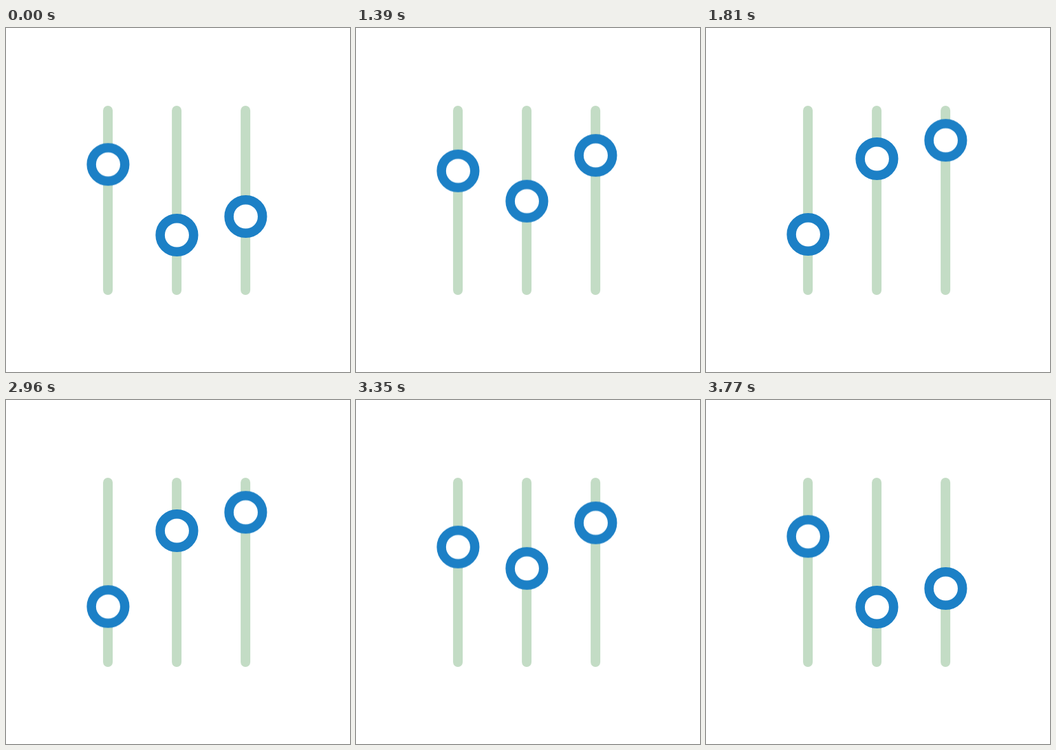
Animation, 500 px wide and 500 px high, one loop 3.8 s. Source, as an HTML page:

```html
<!DOCTYPE html>
<html lang="en">
<head>
<meta charset="utf-8">
<title>Sliders</title>
<style>
  html, body { margin: 0; width: 100%; height: 100%; overflow: hidden; background: #fff; }
  svg { display: block; width: 100%; height: 100%; }
  line { stroke: #c3dcc5; stroke-width: 14; stroke-linecap: round; }
  circle { fill: #fff; stroke: #1c80c6; stroke-width: 13.5; }
</style>
</head>
<body>
<svg id="stage" viewBox="0 0 500 500"></svg>
<script>
const LOOP = 3800;
const FORWARD = 1008, BACK = 2953;
const WIND_UP = 90, TRAVEL = 400, STAGGER = 110;
const OVERSHOOT = 0.09;
const SOFT = 'cubic-bezier(.333,0,.667,1)';
const GLIDE = 'cubic-bezier(.1,0,.9,1)';

// The rightmost knob leads on the way out, the leftmost on the way back.
const knobs = [
  { x: 148.4, from: 198.3, to: 300 },
  { x: 248.4, from: 301, to: 190 },
  { x: 348.4, from: 274, to: 163.2 },
];

const stage = document.getElementById('stage');

function add(tag, attrs) {
  const node = document.createElementNS('http://www.w3.org/2000/svg', tag);
  for (const name in attrs) node.setAttribute(name, attrs[name]);
  return stage.appendChild(node);
}

function key(time, y, easing = 'linear') {
  return { offset: time / LOOP, transform: `translateY(${y}px)`, easing };
}

function move(start, from, to) {
  const extra = (to - from) * OVERSHOOT;
  return [
    key(start, from, SOFT),
    key(start + WIND_UP, from - extra, GLIDE),
    key(start + WIND_UP + TRAVEL, to + extra, SOFT),
    key(start + 2 * WIND_UP + TRAVEL, to),
  ];
}

knobs.forEach(({ x, from, to }, i) => {
  add('line', { x1: x - 0.3, x2: x - 0.3, y1: 120, y2: 381 });
  const ring = add('circle', { cx: x, cy: 0, r: 24.3 });
  ring.animate([
    key(0, from),
    ...move(FORWARD + (2 - i) * STAGGER, from, to),
    ...move(BACK + i * STAGGER, to, from),
    key(LOOP, from),
  ], { duration: LOOP, iterations: Infinity });
});
</script>
</body>
</html>
```
